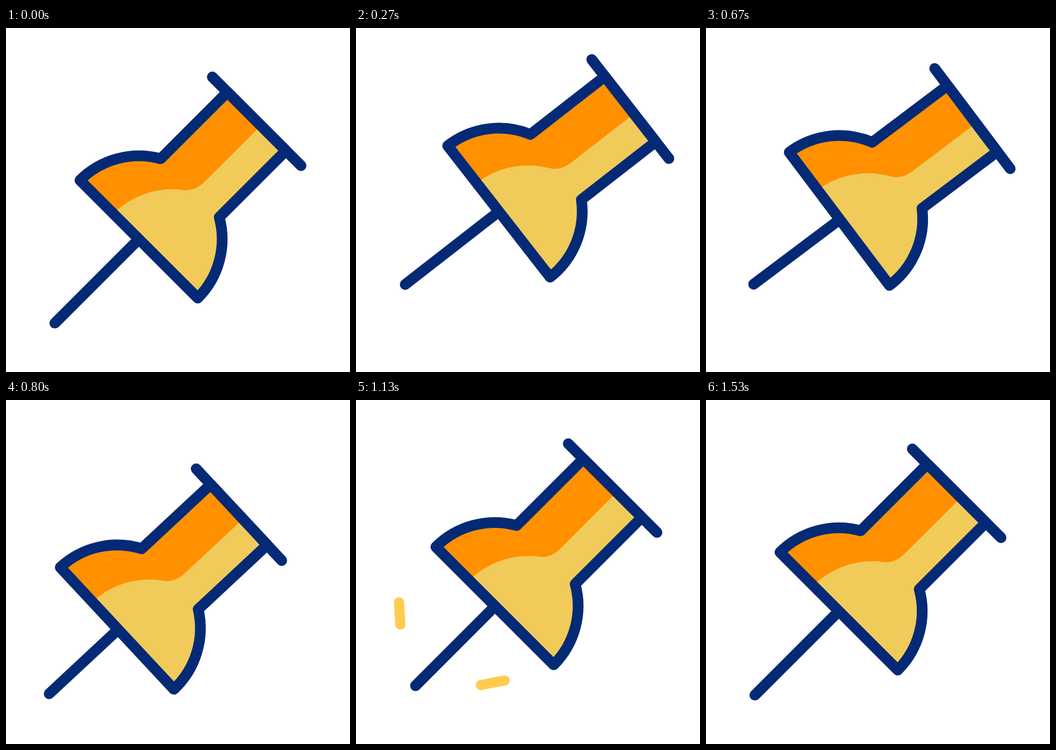
These frames come from a looping animation (640 px wide and 640 px high, 2 s). An HTML page with a canvas:

```html
<!DOCTYPE html>
<html lang="en">
<head>
<meta charset="utf-8">
<title>Push pin</title>
<style>
  html, body { margin: 0; width: 100%; height: 100%; overflow: hidden; background: #fff; }
  canvas { display: block; width: 640px; height: 640px; }
</style>
</head>
<body>
<canvas id="stage" width="640" height="640"></canvas>
<script>
const ctx = document.getElementById('stage').getContext('2d');
const LOOP = 2000;
const NAVY = '#042a76', ORANGE = '#ff9000', YELLOW = '#f0cb5a', SPARK = '#ffcc50';

// Pin geometry, with x along the axis from needle to head.
const BASE = -103, HEAD = 207, TIP = -324, RADIUS = 155, NECK = 77, BAR = 116.7;
const NECK_ANGLE = Math.asin(NECK / RADIUS);

// Keys: [tick, x, y, rotation, needle slip], 30 ticks per second.
const PIN_KEYS = [
  [0, 0, 0, 0, 0],
  [15, 49.3, -76.3, 12.85, 0],
  [27, -54.2, 55, 0, 54],
  [37, 29, -27.7, 0, 0],
  [46, 0, 0, 0, 0]
];

const SPARKS = [
  { x: 56.3, y: 527.5, dx: 40, dy: -209, hx: 1.25, hy: 22 },
  { x: 120.6, y: 577.6, dx: 214.5, dy: -82.7, hx: 23.5, hy: -4.4 }
];

function ease(tick, from, to) {
  const p = Math.min(1, Math.max(0, (tick - from) / (to - from)));
  return p * p * (3 - 2 * p);
}

function pose(tick) {
  const i = PIN_KEYS.findIndex(key => key[0] > tick);
  if (i < 0) return [0, 0, 0, 0];
  const a = PIN_KEYS[i - 1], b = PIN_KEYS[i];
  const p = ease(tick, a[0], b[0]);
  return a.slice(1).map((v, k) => v + (b[k + 1] - v) * p);
}

function line(x1, y1, x2, y2) {
  ctx.beginPath();
  ctx.moveTo(x1, y1);
  ctx.lineTo(x2, y2);
  ctx.stroke();
}

function bodyPath() {
  ctx.beginPath();
  ctx.arc(BASE, 0, RADIUS, -Math.PI / 2, -NECK_ANGLE);
  ctx.lineTo(HEAD, -NECK);
  ctx.lineTo(HEAD, NECK);
  ctx.arc(BASE, 0, RADIUS, NECK_ANGLE, Math.PI / 2);
  ctx.closePath();
}

function drawHighlight() {
  ctx.save();
  bodyPath();
  ctx.clip();
  ctx.beginPath();
  ctx.arc(BASE, 88, RADIUS, -Math.PI / 2, -0.652);
  ctx.bezierCurveTo(28.7, 5, 42, 11, 58, 11);
  ctx.lineTo(HEAD, 11);
  ctx.lineTo(HEAD, 160);
  ctx.lineTo(BASE, 160);
  ctx.fillStyle = YELLOW;
  ctx.fill();
  ctx.restore();
}

function drawPin(tick) {
  const [x, y, rotation, slip] = pose(tick);
  const drift = slip * 0.065;
  ctx.save();
  ctx.translate(320 + x, 320 + y);
  ctx.rotate((rotation - 45) * Math.PI / 180);
  ctx.strokeStyle = NAVY;
  line(TIP + slip, drift, BASE + slip, drift);
  bodyPath();
  ctx.fillStyle = ORANGE;
  ctx.fill();
  drawHighlight();
  bodyPath();
  ctx.stroke();
  line(HEAD, -BAR, HEAD, BAR);
  ctx.restore();
}

function drawSparks(tick) {
  if (tick < 27 || tick >= 40) return;
  const travel = ease(tick, 27, 39), size = 1 - ease(tick, 33, 40);
  ctx.strokeStyle = SPARK;
  for (const s of SPARKS) {
    ctx.save();
    ctx.translate(s.x + s.dx * travel, s.y + s.dy * travel);
    ctx.scale(size, size);
    line(-s.hx, -s.hy, s.hx, s.hy);
    ctx.restore();
  }
}

// Ticks start at 0, 30 and 70 ms of every 100 ms.
function tickAt(ms) {
  const rest = ms % 100;
  return 3 * Math.floor(ms / 100) + (rest >= 30) + (rest >= 70);
}

function render() {
  const tick = tickAt(performance.now() % LOOP);
  ctx.fillStyle = '#fff';
  ctx.fillRect(0, 0, 640, 640);
  ctx.lineWidth = 20;
  ctx.lineCap = ctx.lineJoin = 'round';
  drawSparks(tick);
  drawPin(tick);
  requestAnimationFrame(render);
}
render();
</script>
</body>
</html>
```
